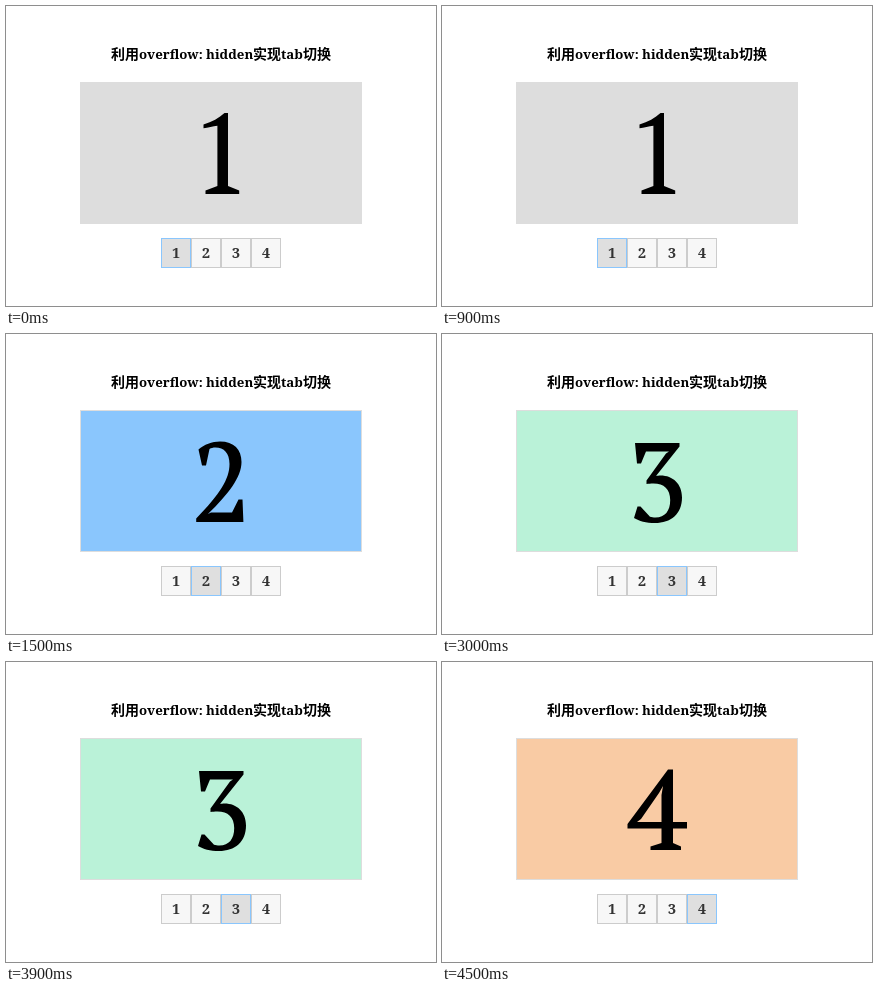
Write an HTML page that moves like this. It is 430 px wide and 300 px high and loops after 6 s.

```html
<!DOCTYPE html>
<html lang="zh-CN">
<head>
<meta charset="utf-8">
<title>Tab 切换</title>
<style>
  html, body { margin: 0; width: 100%; height: 100%; overflow: hidden; background: #fff; }
  svg { display: block; position: absolute; left: 0; top: 0; }
  text { font-family: "Noto Serif", serif; font-weight: 700; }
  .title { font-size: 13.25px; fill: #000; }
  .zh { font-family: "Noto Sans CJK SC", "Noto Sans CJK", sans-serif; font-size: 14px; font-weight: 700; }
  .tab rect { fill: #f7f7f7; stroke: #ccc; }
  .tab text { font-size: 14.4px; fill: #333; text-anchor: middle; }
  .tab.on rect { fill: #dfdfdf; stroke: #8ac6fd; }
  .slide { visibility: hidden; }
  .slide.on { visibility: visible; }
</style>
</head>
<body>
<svg id="stage" width="430" height="300" viewBox="0 0 430 300">
  <text class="title" y="53">
    <tspan class="zh" x="105">利用</tspan><tspan x="133">overflow: hidden</tspan><tspan class="zh" x="247">实现</tspan><tspan x="275">tab</tspan><tspan class="zh" x="297">切换</tspan>
  </text>
  <rect x="74.5" y="76.5" width="281" height="141" fill="none" stroke="#ddd"/>
</svg>
<script>
const HOLD = 1500;

// panel colour and large numeral outline
const slides = [
  ['#ddd', 'M197.5 118.5C206 116 213 112 218.5 107H222V180L233.2 184.5V188H199.5V184.5L211.4 180V119.8C207 120.5 202 121.8 197.5 122.3Z'],
  ['#8ac6fd', 'M192.5 115.5C198 110.5 206 107.5 214 107.5C228 107.5 235.5 115.5 235.5 128C235.5 143 222.5 160 202 180L205 178.5H226L232.5 165.5H236.5L237.4 188H190.2V184.5C214 160 223.5 145 223.5 130C223.5 119 218 113.5 209.5 113.5C207 113.5 205 114 203.5 115L200 131.5H196Z'],
  ['#baf2d8', 'M193 109H237.5V112.5L214 142C215 141.7 217 141.5 218.5 141.5C231 141.5 240 150 240 163.5C240 180 229 189 213 189C204 189 197 187 192 184L195.5 172.5H198.5L208 182.7C209.5 183.2 211.5 183.5 213.5 183.5C223 183.5 228.2 177 228.2 166C228.2 155 222 149.5 211.5 149.5C208.5 149.5 206.5 149.7 204.5 150V146.5L224 119.5L227 117.5H204L199 129.5H195Z'],
  ['#f9cba4', 'M185.5 162L226 107.5H231V160H245V166.5H231V181L239 184.5V188H208.5V184.5L219.5 181V166.5H185.5ZM195 160H219.5V133L221 124L217 131L199 157Z']
];

const stage = document.getElementById('stage');

function add(parent, tag, attrs, text = '') {
  const el = document.createElementNS('http://www.w3.org/2000/svg', tag);
  for (const key in attrs) el.setAttribute(key, attrs[key]);
  el.textContent = text;
  return parent.appendChild(el);
}

const views = slides.map(([fill, d], i) => {
  const slide = add(stage, 'g', { class: 'slide', role: 'img', 'aria-label': i + 1 });
  add(slide, 'rect', { x: 75, y: 77, width: 280, height: 140, fill });
  add(slide, 'path', { d, 'fill-rule': 'evenodd' });

  const x = 155 + i * 30;
  const tab = add(stage, 'g', { class: 'tab' });
  add(tab, 'rect', { x: x + 0.5, y: 232.5, width: 29, height: 29 });
  add(tab, 'text', { x: x + 15, y: 252 }, i + 1);
  return [slide, tab];
});

const start = performance.now();

function draw() {
  const time = Math.max(0, performance.now() - start);
  const active = Math.floor(time / HOLD) % slides.length;
  views.forEach((parts, i) =>
    parts.forEach(el => el.classList.toggle('on', i === active)));
  requestAnimationFrame(draw);
}
draw();
</script>
</body>
</html>
```
